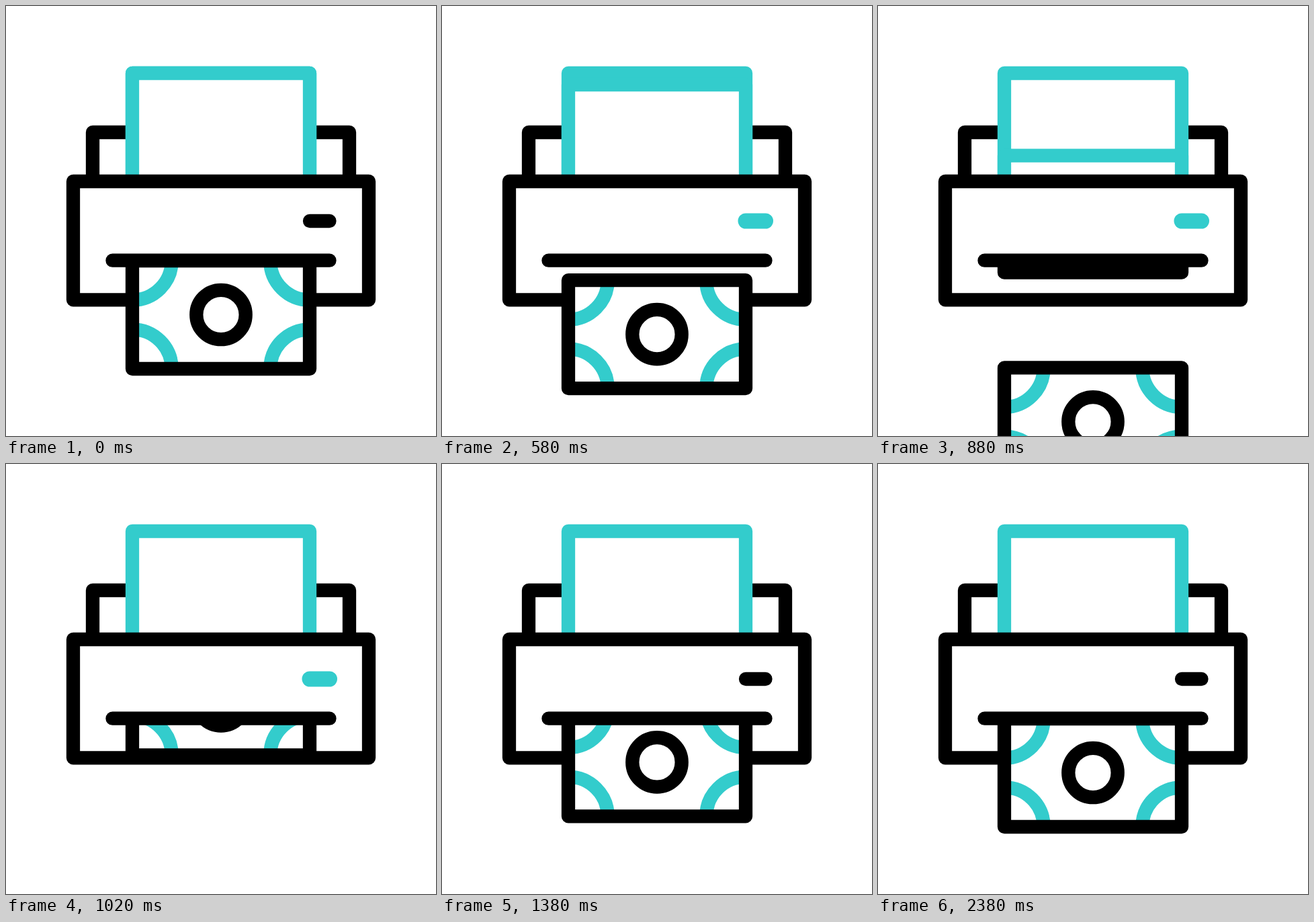
Recreate the animation shown at these times as an HTML page. Size 640 px wide and 640 px high, loop 2.4 s.

```html
<!DOCTYPE html>
<html lang="en">
<head>
<meta charset="utf-8">
<title>Money printer</title>
<style>
  html, body { margin: 0; width: 100%; height: 100%; overflow: hidden; background: #fff; }
  svg { display: block; width: 100vw; height: 100vh; }
  .ink, .teal { stroke-width: 20.3; stroke-linejoin: round; stroke-linecap: round; }
  .ink { stroke: #000; fill: #fff; }
  .teal { stroke: #33cccc; fill: #fff; }
  .open { fill: none; }
</style>
</head>
<body>
<svg viewBox="0 0 640 640">
  <defs>
    <clipPath id="inside"><rect x="188" y="379" width="264" height="161"/></clipPath>
    <clipPath id="below"><rect y="379" width="640" height="261"/></clipPath>
    <path id="sheet" class="teal" d="M188 300V100H452V300"/>
    <g id="bill">
      <rect x="188" y="379" width="264" height="161" fill="#fff"/>
      <g clip-path="url(#inside)">
        <circle class="teal open" cx="188" cy="379" r="58.7"/>
        <circle class="teal open" cx="452" cy="379" r="58.7"/>
        <circle class="teal open" cx="188" cy="540" r="58.7"/>
        <circle class="teal open" cx="452" cy="540" r="58.7"/>
      </g>
      <circle class="ink" cx="320" cy="459.5" r="36.7"/>
      <rect class="ink open" x="188" y="379" width="264" height="161"/>
    </g>
  </defs>

  <path class="ink" d="M129 261V188H511V261"/>
  <use href="#sheet"/>
  <use href="#sheet" id="feed"/>
  <rect class="ink" x="100" y="261" width="440" height="176.3"/>
  <path class="ink" d="M452 320H481.5"/>
  <path class="teal" id="lamp" style="stroke-width:23" d="M452 320H481.5"/>
  <g clip-path="url(#below)">
    <use href="#bill" id="fresh"/>
    <use href="#bill" id="done"/>
  </g>
  <path class="ink" d="M158.5 378.7H481.5"/>
</svg>
<script>
  const LOOP = 2400;
  const [feed, fresh, done, lamp] =
    ["feed", "fresh", "done", "lamp"].map(id => document.getElementById(id));

  const span = (t, from, to) => Math.min(1, Math.max(0, (t - from) / (to - from)));
  const smooth = u => u * u * (3 - 2 * u);

  // Slow start that turns into a fast drop
  const drop = (u, slow, fast, power) => slow * u ** 2 + fast * u ** power;

  function place(node, y, shown) {
    node.setAttribute("transform", `translate(0 ${y.toFixed(3)})`);
    node.style.display = shown ? "" : "none";
  }

  function draw(t) {
    const u = Math.max(0, (t - 240) / 640);
    const feedY = drop(u, 48, 74, 4.9);
    const doneY = drop(u, 95.8, 62.7, 5.5);
    // The new bill runs slightly past its rest, then eases back
    const freshY = -181 + 182 * smooth(span(t, 600, 1560)) - smooth(span(t, 1560, 2380));

    place(feed, feedY, feedY < 170);
    place(done, doneY, doneY < 290);
    place(fresh, freshY, t >= 600);
    lamp.style.display = Math.floor(t / 540) % 2 ? "" : "none";
  }

  const start = performance.now();
  function tick() {
    draw((performance.now() - start) % LOOP);
    requestAnimationFrame(tick);
  }
  tick();
</script>
</body>
</html>
```
